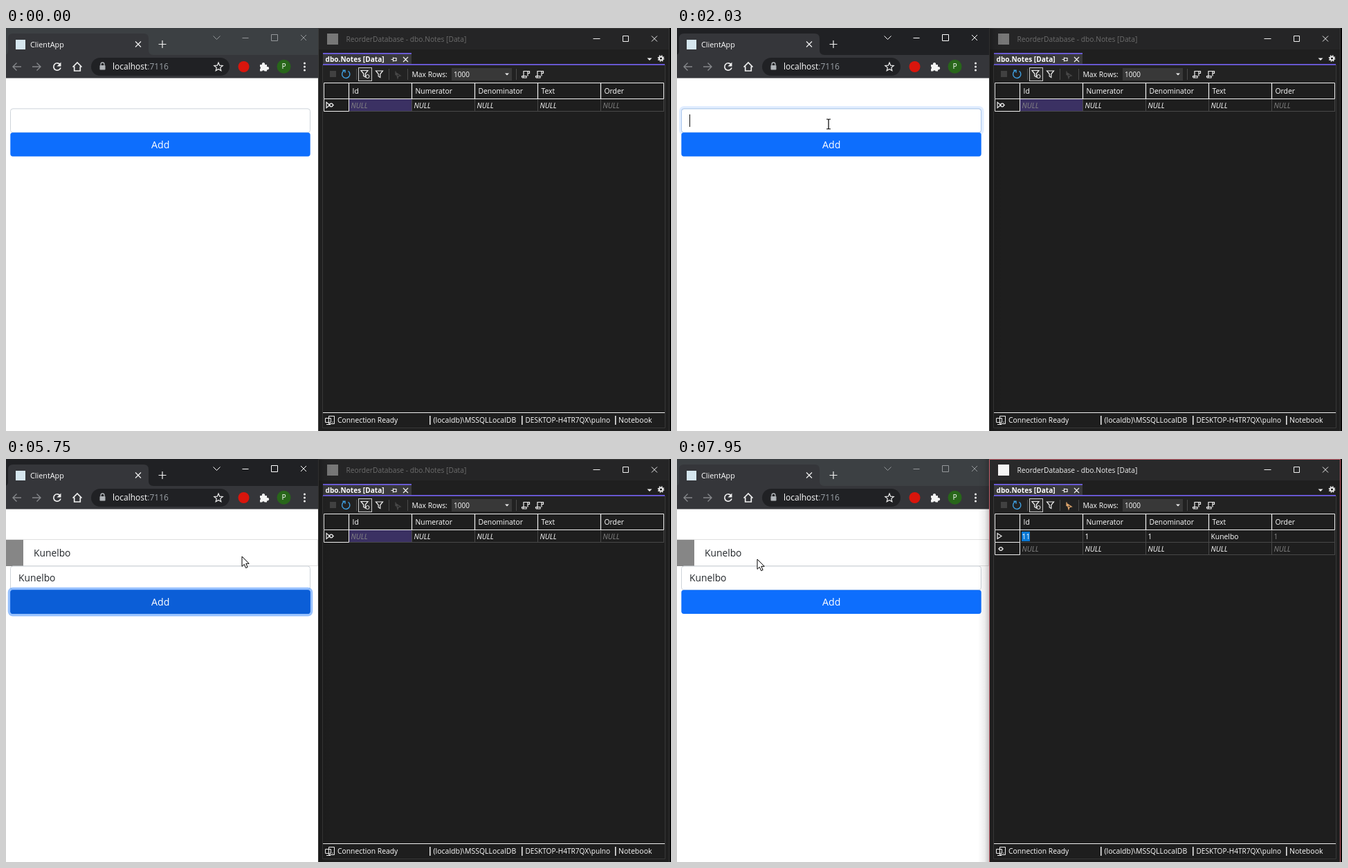
Recreate the animation shown at these times as an HTML page. Size 961 by 583 pixels, loop 8 s.

```html
<!DOCTYPE html>
<html lang="en">
<head>
<meta charset="utf-8">
<title>Notes demo</title>
<style>
  html, body { margin: 0; width: 100%; height: 100%; overflow: hidden; background: #000; }
  svg { display: block; width: 100%; height: 100%; }
  text { font-family: "Open Sans", "Noto Sans", sans-serif; font-size: 10.35px; fill: #fff; white-space: pre; }
  .line { fill: none; stroke: #f0f0f0; stroke-width: 1.2; }
  .thin { stroke-width: 1; }
  .page { font-size: 13.8px; fill: #212529; }
  .null { font-style: italic; }
  .dim { fill: #858585; }
  #strip { fill: #3c4043; }
  #controls { stroke: #94979a; stroke-width: 1; }
  .browser-front #strip { fill: #202124; }
  .browser-front #controls { stroke: #fff; }
  #dbBar { fill: #252526; }
  #dbTitle { fill: #6c6c6c; font-size: 10.25px; }
  #dbMark { fill: #777; }
  #dbEdge { stroke: #3b3b3b; }
  .db-front #dbBar { fill: #29292a; }
  .db-front #dbTitle { fill: #f0f0f0; }
  .db-front #dbMark { fill: #f5f5f5; }
  .db-front #dbEdge { stroke: #c8606c; }
  #browserShadow, #dbShadow { display: none; }
  .browser-front #browserShadow, .db-front #dbShadow { display: inline; }
</style>
</head>
<body>
<svg id="stage" viewBox="0 0 961 583">
  <defs>
    <linearGradient id="shade">
      <stop stop-opacity=".22"/><stop offset=".4" stop-opacity=".07"/><stop offset="1" stop-opacity="0"/>
    </linearGradient>
    <g id="script" class="line">
      <path d="M-3 4.5V-4.5H5.5V-1.5H3M3-4.5V2.5M-5.5 2.5H1V5H-4.5Q-6 4-5.5 2.5"/>
    </g>
    <path id="funnel" class="line" d="M-5-4.5H5L1.3 0V5L-1.3 3.5V0Z"/>
    <path id="cross" d="M-4-4L4 4M4-4L-4 4"/>
    <path id="a" d="M0 0V14.4L3.3 11.3L5.6 16.6L8.1 15.5L5.8 10.3H10.2Z"
      fill="#fff" stroke="#000" stroke-width="1" stroke-linejoin="round"/>
    <path id="h" d="M-1 1.5Q-1 0 .5 0T2 1.5V7Q4 6 4.8 7.6Q6.8 6.9 7.4 8.4Q10.2 7.9 10.2 10.6V14Q10.2 17 8.4 18.6V21H-1V18.8L-5.2 12.2Q-5.4 10-3.4 10.3L-1 12.6Z
      M2 7V10.5M4.8 8V11M7.4 9V11.5" fill="#fff" stroke="#000" stroke-width="1" stroke-linejoin="round"/>
    <path id="i" d="M-3-7H-1Q0-7 0-6Q0-7 1-7H3M0-6V6M-3 7H-1Q0 7 0 6Q0 7 1 7H3" fill="none" stroke="#000" stroke-width="1.2"/>
  </defs>

  <!-- browser -->
  <rect width="451" height="583" fill="#fff"/>
  <rect id="strip" width="451" height="40"/>
  <path d="M-3 39Q3 39 3 33V15Q3 8 10 8H199Q206 8 206 15V32Q206 39 213 39V72H-3Z" fill="#35363a"/>
  <rect y="39" width="451" height="33.5" fill="#35363a"/>
  <rect x="14" y="17" width="14" height="14" fill="#d5e6ee"/>
  <text x="35" y="27.5" style="font-size:10.8px">ClientApp</text>
  <g class="line">
    <use href="#cross" x="191" y="23.5"/>
    <path d="M220.5 23.5h11M226 18v11"/>
  </g>
  <g id="controls" fill="none">
    <path d="M299.5 11.5l5 5l5-5M341.5 14.5h9M383.5 9.5h9v9h-9z"/>
    <use href="#cross" x="430" y="14"/>
  </g>
  <path d="M22 56H10M15.5 50.5L10 56l5.5 5.5M38 56h12M44.5 50.5L50 56l-5.5 5.5" fill="none" stroke="#85878a" stroke-width="1.4"/>
  <g class="line" style="stroke-width:1.7">
    <path d="M78.3 53A5.2 5.2 0 1 0 79 57.5"/>
    <path d="M96.5 56.5L103 50l6.5 6.5M98.7 55.5V62H107.3V55.5"/>
  </g>
  <path d="M79.5 49.5V55.5H73.5Z" fill="#f0f0f0"/>
  <rect x="123" y="43" width="200" height="26" rx="13" fill="#202124"/>
  <rect x="135.5" y="54" width="8" height="6.5" rx=".8" fill="#b0b4b8"/>
  <path d="M137 54.5V52.5a2.5 2.5 0 0 1 5 0V54.5" fill="none" stroke="#b0b4b8" stroke-width="1.3"/>
  <text x="154" y="60" style="font-size:12px">localhost<tspan fill="#9aa0a6">:7116</tspan></text>
  <path class="line" d="M307 50l1.7 4.2l4.5.3l-3.5 2.9l1.1 4.4l-3.8-2.4l-3.8 2.4l1.1-4.4l-3.5-2.9l4.5-.3z"/>
  <circle cx="343.5" cy="56" r="8" fill="#d9150c"/>
  <path d="M367 53h3a2.2 2.2 0 1 1 4 0h3v3.2a2.2 2.2 0 1 1 0 4V62.5h-3.3a2 2 0 0 0-3.6 0H367v-3.2a2 2 0 0 0 0-3.4z" fill="#f4f4f4"/>
  <circle cx="401.5" cy="55.7" r="10" fill="#28661a"/>
  <text x="401.5" y="59.3" text-anchor="middle">P</text>
  <path d="M431.5 51v.01M431.5 56v.01M431.5 61v.01" stroke="#f4f4f4" stroke-width="3" stroke-linecap="round"/>

  <g id="note">
    <path d="M0 116.5H450.5V154.5H0" fill="#fff" stroke="#dfdfdf"/>
    <rect y="117" width="25" height="38" fill="#868686"/>
    <text class="page" x="40" y="141">Kunelbo</text>
  </g>
  <g id="form">
    <rect id="inputGlow" x="3" y="113" width="440.5" height="42" rx="7" fill="#0d6efd"/>
    <rect x="6.5" y="116.8" width="433" height="34.5" rx="3.5" fill="#fff" stroke="#ced4da"/>
    <rect id="inputEdge" x="6.5" y="116.8" width="433" height="34.5" rx="3.5" fill="none" stroke="#86b7fe"/>
    <text id="typed" class="page" x="18" y="139"></text>
    <path id="caret" d="M0 125V143" stroke="#111" stroke-width="1"/>
    <rect id="buttonGlow" x="2.7" y="147.6" width="440.6" height="41.7" rx="7" fill="#3184fd"/>
    <rect x="6.3" y="151.2" width="433.4" height="34.5" rx="3.6" fill="#0d6efd"/>
    <rect id="buttonDark" x="6.3" y="151.2" width="433.4" height="34.5" rx="3.6" fill="#0b5ed7"/>
    <text x="223.3" y="174" text-anchor="middle" style="font-size:14.2px">Add</text>
  </g>
  <rect id="dbShadow" width="16" height="583" transform="matrix(-1 0 0 1 451 0)" fill="url(#shade)"/>

  <!-- database window -->
  <rect x="451" width="508" height="583" fill="#1f1f1f"/>
  <rect id="dbBar" x="451" width="508" height="31"/>
  <path id="dbEdge" d="M451.5 583V.5H958.5V583" fill="none"/>
  <rect id="dbMark" x="464" y="8" width="16" height="16"/>
  <text id="dbTitle" x="491.5" y="19.8">ReorderDatabase - dbo.Notes [Data]</text>
  <g class="line thin">
    <path d="M848.5 15.5h10M891.5 11.5h8v8h-8z"/>
    <use href="#cross" x="937" y="15.5"/>
  </g>
  <path d="M457.5 53V578.5H952.5V53" fill="#1e1e1e" stroke="#383838"/>
  <rect x="458" y="36" width="128" height="17" fill="#3a3a3d"/>
  <path d="M458 36.8H586M458 52.8H952" stroke="#7160e8" stroke-width="1.7"/>
  <text x="461.5" y="49" style="font-size:10.1px;font-weight:700">dbo.Notes [Data]</text>
  <path class="line" d="M556.5 45.5h3M559.5 42.5v6M560 43.500h4v4h-4M574 42l7 7M581 42l-7 7"/>
  <path d="M926.5 43.5h7l-3.5 3.5z" fill="#eee"/>
  <circle cx="946.5" cy="44" r="2.6" fill="none" stroke="#eee" stroke-width="2"/>
  <circle cx="946.5" cy="44" r="4.2" fill="none" stroke="#eee" stroke-width="1.3" stroke-dasharray="1.65"/>
  <rect x="458" y="54" width="494" height="25" fill="#222"/>
  <rect x="468" y="62" width="9" height="9" fill="#414141"/>
  <rect id="refreshBox" x="482.5" y="57.5" width="19" height="19" fill="#3d3d3d" stroke="#8b8b8b"/>
  <path d="M489 61.7A5.6 5.6 0 1 0 494.5 62.3M486.5 61.2H490V64.7" fill="none" stroke="#3f9fe0" stroke-width="1.4"/>
  <path d="M506.5 59v16M553.5 59v16M580.5 59v16M737.5 59v16" stroke="#4a4a4a"/>
  <rect x="509.5" y="57.5" width="19" height="19" fill="#2d2d2d" stroke="#c8c8c8"/>
  <use href="#funnel" x="518" y="66"/>
  <circle cx="522.5" cy="70" r="2.5" fill="#2d2d2d" stroke="#f0f0f0"/>
  <use href="#funnel" x="539.5" y="66.5"/>
  <path id="runIcon" d="M563 62.5v5h3M564 65l6 4l-3 .5l-1 3z" fill="none" stroke-width="1.3"/>
  <text x="586.5" y="71">Max Rows:</text>
  <rect x="644" y="58" width="87" height="18" fill="#383838"/>
  <text x="647" y="71" style="font-size:10px">1000</text>
  <path d="M721 65.5h6l-3 3z" fill="#eee"/>
  <use href="#script" x="751" y="67"/>
  <use href="#script" x="771" y="67"/>
  <g id="grid"></g>
  <path class="line thin" d="M458 556.5H952"/>
  <path class="line thin" d="M466.5 561.5h8v11h-8zM461.5 564.5h8v6h-8zM463 573.5h6M472 569.5v1.5"/>
  <text x="479" y="571">Connection Ready</text>
  <path d="M612.8 561v13M745.8 561v13M880.8 561v13" stroke="#f0f0f0" stroke-width="1.5"/>
  <text x="617.5" y="571" style="font-size:10.5px">(localdb)\MSSQLLocalDB</text>
  <text x="750.5" y="571" style="font-size:10.1px">DESKTOP-H4TR7QX\pulno</text>
  <text x="885" y="571" style="font-size:10.5px">Notebook</text>
  <rect id="browserShadow" x="451" width="20" height="583" fill="url(#shade)"/>

  <use id="pointer"/>
  <circle id="click" r="11" fill="#ff0" opacity=".5"/>
</svg>
<script>
const $ = id => document.getElementById(id);
const LOOP = 8000, STEP = 1000 / 15;
const NAME = "Kunelbo";
const columns = [495, 586, 677, 768, 859];
const keyTimes = [2950, 3090, 3290, 3350, 3560, 3890, 4080];
const clicks = [[1870, 2010, 219, 139], [4680, 4810, 218, 174], [6820, 6950, 490, 73]];
// pointer activity starts anew at each of these times
const bursts = [0, 730, 1870, 4350, 5490, 6350, 7280];

// time, x, y, pointer shape: a arrow, h hand, i text beam
const path = [
  [730, 859, 552, "a"], [930, 650, 430, "a"], [1130, 335, 230, "a"], [1200, 268, 184, "h"],
  [1270, 235, 158, "h"], [1330, 225, 146, "h"], [1400, 220, 141, "i"], [1470, 219, 139, "i"],
  [4290, 219, 139, "i"], [4420, 218, 152, "h"], [4620, 218, 174, "h"], [4810, 218, 174, "h"],
  [4880, 220, 175, "i"], [5210, 220, 175, "i"], [5280, 225, 175, "i"], [5420, 225, 175, "i"],
  [5490, 229, 173, "i"], [5620, 272, 160, "i"], [5690, 304, 151, "a"], [5755, 340, 141, "a"],
  [5950, 460, 105, "a"], [6220, 558, 77, "a"], [6290, 558, 77, "a"], [6550, 518, 77, "a"],
  [6680, 490, 73, "a"], [7280, 490, 73, "a"], [7400, 445, 125, "a"], [7530, 362, 196, "h"],
  [7670, 248, 203, "h"], [7800, 165, 174, "i"], [7870, 132, 152, "a"], [7945, 116, 145, "a"]
];

function row(y, values, style) {
  const cells = values.map((value, i) =>
    `<text class="${style} ${i % 4 ? "" : "dim"}" x="${columns[i] + 3.5}" y="${y + 12.7}">${value}</text>`);
  const lines = columns.slice(1).concat(950).map(x => `M${x + .5} ${y}v18`).join("");
  return `<path d="${lines}M496 ${y + 17.5}H951" stroke="#484848" fill="none"/>
    <path class="line thin" d="M459.5 ${y}v17.5H495.5V${y}"/>${cells.join("")}`;
}

function buildGrid() {
  const heads = ["Id", "Numerator", "Denominator", "Text", "Order"];
  const nulls = Array(5).fill("NULL");
  const star = (x, y) => `<circle class="line" cx="${x}" cy="${y}" r="2.3"/>
    <path class="line" d="M${x - 4} ${y}h2M${x + 2} ${y}h2"/>`;
  $("grid").innerHTML = `
    <path class="line thin" d="M459.5 102.5V79.5H950.5V102.5Z"/>
    <path class="line" d="${columns.map(x => `M${x + .5} 80v22`).join("")}"/>
    ${heads.map((head, i) => `<text x="${columns[i] + 5.5}" y="95">${head}</text>`).join("")}
    <g id="empty"><rect x="496" y="103" width="90" height="18" fill="#3b3163"/>
      ${row(103, nulls, "null")}<path class="line" d="M463 107.5v8l5-4z"/>${star(470, 111.5)}</g>
    <g id="loaded"><rect x="498" y="105" width="12" height="14" fill="#0a78d4"/>
      ${row(103, ["<tspan fill='#fff'>11</tspan>", 1, 1, NAME, 1], "")}
      ${row(121, nulls, "null")}
      <path class="line" d="M463 107.5v8l6-4z"/>${star(468, 130)}</g>`;
}

const clamp = v => Math.max(0, Math.min(1, v));
const between = (t, from, to) => t >= from && t < to;
const fade = (t, on, off) => clamp((t - on) / 150) - clamp((t - off) / 150);
const show = (id, on) => $(id).setAttribute("visibility", on ? "visible" : "hidden");
const opacity = (id, v) => $(id).setAttribute("opacity", v);

function placePointer(t) {
  const k = path.findLastIndex(p => p[0] <= t);
  show("pointer", k >= 0);
  if (k < 0) return;
  const from = path[k], to = path[k + 1] || from;
  const f = to === from ? 0 : (t - from[0]) / (to[0] - from[0]);
  $("pointer").setAttribute("href", "#" + from[3]);
  $("pointer").setAttribute("x", Math.round(from[1] + (to[1] - from[1]) * f));
  $("pointer").setAttribute("y", Math.round(from[2] + (to[2] - from[2]) * f));
}

function render(time) {
  // motion advances in 15 steps per second, counted from the start of each burst
  const burst = bursts.findLast(b => b <= time);
  const t = burst + Math.floor((time - burst + 8) / STEP) * STEP;
  const added = time >= 4815, loaded = time >= 7280;
  $("stage").classList.toggle("browser-front", between(time, 1935, 6815));
  $("stage").classList.toggle("db-front", time >= 6815);

  $("typed").textContent = NAME.slice(0, keyTimes.filter(k => k <= time).length);
  $("caret").setAttribute("transform", `translate(${18.5 + $("typed").getComputedTextLength()})`);
  show("caret", between(time, 1935, 2480) || between(time, 2950, 4580));

  const inputFocus = fade(t, 1930, 4685), buttonFocus = fade(t, 4685, 6815);
  opacity("inputGlow", inputFocus * .25);
  opacity("inputEdge", inputFocus);
  opacity("buttonGlow", buttonFocus * .5);
  opacity("buttonDark", Math.max(fade(t, 1180, 1335), fade(t, 4420, 6815), fade(t, 7500, 7770)));

  $("form").setAttribute("transform", `translate(0 ${added ? 38.2 : 0})`);
  show("note", added);
  show("empty", !loaded);
  show("loaded", loaded);
  show("refreshBox", between(time, 6615, 7340));
  $("runIcon").setAttribute("stroke", loaded ? "#e0a66c" : "#484848");

  placePointer(t);
  const click = clicks.find(c => between(time, c[0], c[1]));
  show("click", click);
  if (click) $("click").setAttribute("transform", `translate(${click[2]} ${click[3]})`);
}

buildGrid();
const start = performance.now();
function tick() {
  render((performance.now() - start) % LOOP);
  requestAnimationFrame(tick);
}
tick();
</script>
</body>
</html>
```
